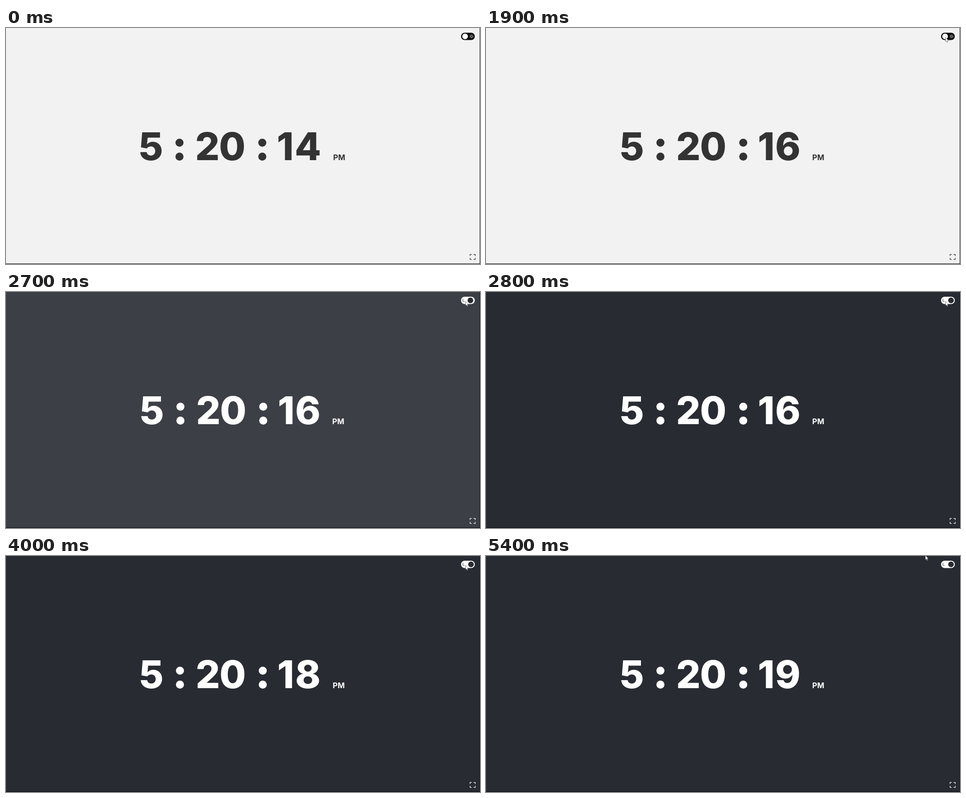
Write an HTML page with a canvas that moves like this. It is 1000x500 px and loops after 5.9 s.

```html
<!DOCTYPE html>
<html lang="en">
<head>
<meta charset="utf-8">
<title>Clock</title>
<style>
  html, body { margin: 0; height: 100%; overflow: hidden; background: #f2f2f2; }
  canvas { display: block; width: 100vw; height: 100vh; }
</style>
</head>
<body>
<canvas id="stage" width="1000" height="500"></canvas>
<script>
const ctx = document.getElementById('stage').getContext('2d');
const LOOP = 5900, STEP = 100, BASELINE = 280.3;
const LIGHT = [242, 242, 242], DARK = [41, 43, 51];

// Half the width lost against the widest time, for seconds 14 to 19
const INSET = [0, 4, 2, 3, 1, 2];

// Pointer tip: time, x, y
const PATH = [
  [200, 994, 73], [600, 973, 33], [800, 973, 33], [1400, 972, 25], [1900, 969.5, 20],
  [4500, 969.5, 20], [5000, 940, 7], [5200, 940, 7], [5400, 927, -1]
];
const ARROW = [[0, 0], [0, 9], [2, 7.2], [3.4, 10.4], [4.9, 9.8], [3.5, 6.8], [6.2, 6.5]];

const clamp = v => Math.min(1, Math.max(0, v));
const lerp = (a, b, p) => a + (b - a) * p;
const rgb = c => `rgb(${c.map(Math.round)})`;

function rect(x, y, w, h, color) {
  ctx.fillStyle = color;
  ctx.fillRect(x, y, w, h);
}

function dot(x, y, r, color) {
  ctx.fillStyle = color;
  ctx.beginPath();
  ctx.arc(x, y, r, 0, Math.PI * 2);
  ctx.fill();
}

// Centres the visible part of the text on x
function label(text, x, size, weight) {
  ctx.font = `${weight} ${size}px Inter, sans-serif`;
  const m = ctx.measureText(text);
  ctx.fillText(text, x - (m.actualBoundingBoxRight - m.actualBoundingBoxLeft) / 2, BASELINE);
}

function drawTime(seconds, ink) {
  const inset = INSET[seconds - 14];
  for (const x of [366, 540.7]) {
    dot(x + inset, 243, 8.5, ink);
    dot(x + inset, 272.4, 8.5, ink);
  }
  ctx.fillStyle = ink;
  const [tens, units] = String(seconds);
  for (const [ch, x] of [['5', 306.3], ['2', 424.5], ['0', 477.3], [tens, 588.7]]) {
    label(ch, x + inset, 81, 800);
  }
  label(units, 637, 81, 800);
  label('PM', 703 - inset, 16, 700);
}

function drawSun(x, y) {
  ctx.strokeStyle = '#ddd';
  ctx.lineWidth = 0.9;
  ctx.beginPath();
  ctx.arc(x, y, 1.9, 0, Math.PI * 2);
  for (let i = 0; i < 8; i++) {
    const c = Math.cos(i * Math.PI / 4), s = Math.sin(i * Math.PI / 4);
    ctx.moveTo(x + c * 2.8, y + s * 2.8);
    ctx.lineTo(x + c * 4.4, y + s * 4.4);
  }
  ctx.stroke();
}

function drawMoon(x, y) {
  dot(x, y, 3.4, '#999');
  dot(x + 1.7, y - 0.8, 3, '#fff');
}

function drawToggle(dark, mix) {
  ctx.fillStyle = dark ? '#fff' : '#0b0b0b';
  ctx.beginPath();
  ctx.roundRect(960, 10, 29, 15.5, 7.75);
  ctx.fill();
  if (dark) drawMoon(966, 17.7);
  else drawSun(982.2, 17.8);
  dot(lerp(968.5, 981, mix), 17.7, 6, dark ? rgb(DARK) : '#fff');
}

function drawExpand(ink) {
  ctx.strokeStyle = ink;
  ctx.lineWidth = 1.2;
  ctx.beginPath();
  for (const sx of [-1, 1]) {
    for (const sy of [-1, 1]) {
      const x = 984.5 + sx * 5.4, y = 485 + sy * 5.4;
      ctx.moveTo(x - sx * 3.4, y);
      ctx.lineTo(x, y);
      ctx.lineTo(x, y - sy * 3.4);
    }
  }
  ctx.stroke();
}

function drawPointer(t) {
  if (t < PATH[0][0]) return;
  const i = PATH.findIndex(k => k[0] > t);
  const b = i < 0 ? PATH[PATH.length - 1] : PATH[i];
  const a = i < 0 ? b : PATH[i - 1];
  const p = a === b ? 1 : (t - a[0]) / (b[0] - a[0]);
  const x = lerp(a[1], b[1], p), y = lerp(a[2], b[2], p);
  ctx.beginPath();
  for (const [dx, dy] of ARROW) ctx.lineTo(x + dx, y + dy);
  ctx.closePath();
  ctx.fillStyle = '#fff';
  ctx.fill();
  ctx.strokeStyle = '#444';
  ctx.lineWidth = 0.6;
  ctx.stroke();
}

function draw(now) {
  const t = Math.floor(now % LOOP / STEP) * STEP;
  const mix = 1 - Math.pow(1 - clamp((t - 2500) / 300), 2.1);
  const dark = mix > 0;
  const ink = dark ? '#fff' : '#333';
  const seconds = 15 + Math.floor((t - 850) / 1020);

  rect(0, 0, 1000, 500, rgb(LIGHT.map((v, i) => lerp(v, DARK[i], mix))));
  rect(999, 0, 1, 500, dark ? '#15161a' : '#444');
  rect(0, 499, 1000, 1, '#0a0a0a');
  drawTime(seconds, ink);
  drawToggle(dark, mix);
  drawExpand(ink);
  drawPointer(t);
  requestAnimationFrame(draw);
}
requestAnimationFrame(draw);
</script>
</body>
</html>
```
